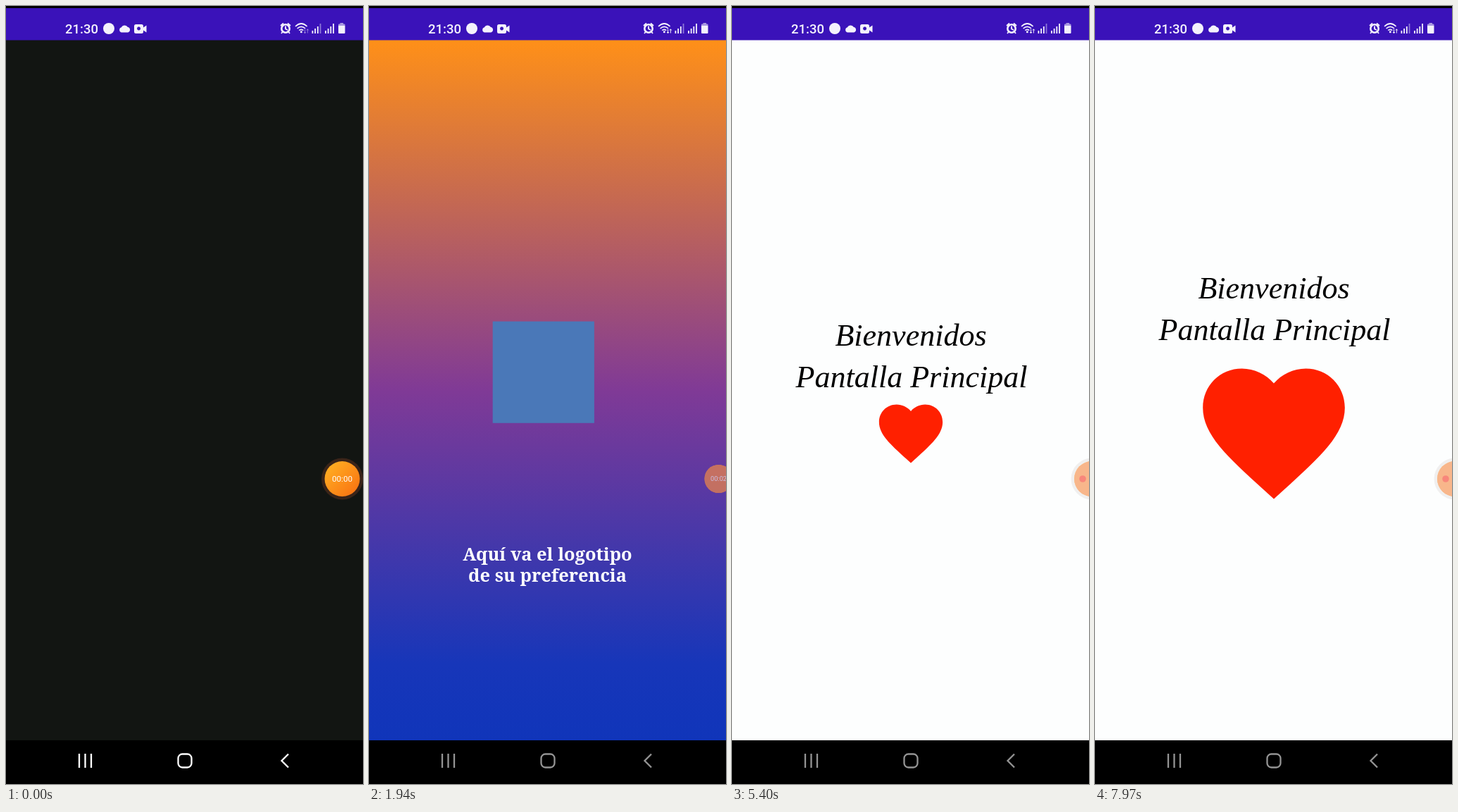
Write an HTML page that moves like this. It is 507x1104 px and loops after 8000 ms.

```html
<!DOCTYPE html>
<html lang="es">
<head>
<meta charset="utf-8">
<title>Bienvenidos</title>
<style>
  html, body { margin: 0; width: 100%; height: 100%; overflow: hidden; background: #000; }
  svg { display: block; }
  text { text-anchor: middle; }
  .clock { font: 500 18.5px Roboto, sans-serif; text-anchor: start; }
  .timer { font: 11.6px Roboto, sans-serif; }
  .slogan { font: bold 24.5px "Noto Serif", serif; }
  .welcome { font: italic 44px "Liberation Serif", serif; }
</style>
</head>
<body>
<svg width="507" height="1104" viewBox="0 0 507 1104">
  <defs>
    <linearGradient id="sky" x2="0" y2="1">
      <stop stop-color="#ff9018"/>
      <stop offset=".5" stop-color="#803a96"/>
      <stop offset=".89" stop-color="#1736b9"/>
      <stop offset="1" stop-color="#1035ba"/>
    </linearGradient>
    <linearGradient id="amber" x2="1" y2="1">
      <stop offset=".1" stop-color="#ffae22"/>
      <stop offset=".9" stop-color="#fa7412"/>
    </linearGradient>
  </defs>

  <rect y="48" width="507" height="994" fill="#fdfefe"/>

  <g id="splash">
    <rect y="48" width="507" height="994" fill="url(#sky)"/>
    <g id="logo"><rect x="-75" y="-32.8" width="139" height="139" fill="#4a78b8"/></g>
    <g id="slogan" class="slogan" fill="#fff">
      <text y="-7">Aquí va el logotipo</text>
      <text y="22">de su preferencia</text>
    </g>
  </g>

  <g id="home">
    <g id="welcome" class="welcome">
      <text x="254">Bienvenidos</text>
      <text x="255" y="59">Pantalla Principal</text>
    </g>
    <path id="heart" fill="#ff2000" d="M12 21.35l-1.45-1.32C5.4 15.36 2 12.28 2 8.5 2 5.42 4.42 3 7.5 3c1.74 0 3.41.81 4.5 2.09C13.09 3.81 14.76 3 16.5 3 19.58 3 22 5.42 22 8.5c0 3.78-3.4 6.86-8.55 11.54z"/>
  </g>

  <rect id="dark" y="48" width="507" height="994" fill="#121512"/>

  <!-- status bar -->
  <rect width="507" height="3"/>
  <rect y="3" width="507" height="45.5" fill="#3a12b9"/>
  <g fill="#f4f2fc">
    <text class="clock" x="84" y="38.7">21:30</text>
    <circle cx="146" cy="32" r="8"/>
    <path d="M164 37.5a3.7 3.7 0 0 1 0-7.2a5 5 0 0 1 8.6-.6a4 4 0 0 1 .6 7.8z"/>
    <path fill-rule="evenodd" d="M184.500 26h8q2.500 0 2.500 2.500v2l4.500-3v10l-4.500-3v2q0 2.500-2.500 2.500h-8q-2.500 0-2.500-2.500v-8q0-2.500 2.500-2.500zm4 3.500a2.500 2.500 0 1 0 .1 0z"/>
    <circle cx="397" cy="32" r="5.700" fill="none" stroke="#f4f2fc" stroke-width="2.600"/>
    <path d="M397 28.500v4l3 1.500M390 28l4-3.500M404 28l-4-3.500M392.500 37l-1.500 2M401.500 37l1.500 2" fill="none" stroke="#f4f2fc" stroke-width="1.800"/>
    <path d="M411 29q8.300-8 16.600 0M413.600 32q5.700-5.300 11.400 0M416.300 34.700q3-2.600 6 0" fill="none" stroke="#f4f2fc" stroke-width="1.700"/>
    <circle cx="419.300" cy="36.800" r="1.500"/>
    <path id="traffic" d="M424.500 33v5.500m-1.500-1.500l1.500 1.700 1.500-1.700M428.300 38.500v-5.500m-1.500 1.500l1.500-1.700 1.500 1.700" fill="none" stroke="#f4f2fc"/>
    <path d="M434.500 35h1.800v4h-1.800zm3.700-3h1.800v7h-1.800zm3.700-3h1.800v10h-1.800zM453 35h1.800v4h-1.800zm3.700-3h1.800v7h-1.800zm3.700-3h1.800v10h-1.800zm3.700-4h1.800v14h-1.800z"/>
    <path d="M445.600 25h1.800v14h-1.800z" opacity=".45"/>
    <path d="M474.500 24h4.500v1.500h1.500q1 0 1 1v1.500h-9.500v-1.500q0-1 1-1h1.500z" opacity=".6"/>
    <path d="M472 28h9.500v10q0 1-1 1h-7.500q-1 0-1-1z"/>
  </g>

  <!-- navigation bar -->
  <rect y="1042" width="507" height="62"/>
  <g id="nav" fill="none" stroke="#fff" stroke-width="2.300">
    <path d="M104 1061v20M112.500 1061v20M121 1061v20M401 1061.500l-9.500 9.500 9.500 9.500"/>
    <rect x="244.500" y="1061.500" width="19" height="19" rx="6"/>
  </g>

  <!-- recorder bubble -->
  <g id="bubble">
    <circle id="ring" r="29.500" fill="#3a2419"/>
    <circle r="25" fill="url(#amber)"/>
    <circle id="tint" r="25" fill="#f58b45"/>
    <text id="timer" class="timer" y="4" fill="#fff">00:00</text>
    <circle id="dot" cx="-13" r="4.800" fill="#f5402c"/>
  </g>
</svg>

<script>
const LOOP = 8000;
const el = Object.fromEntries([...document.querySelectorAll('svg [id]')].map(e => [e.id, e]));
const set = (node, attrs) => { for (const k in attrs) node.setAttribute(k, attrs[k]); };
const mix = (a, b, p) => a + (b - a) * p;
const progress = (t, from, to) => Math.min(1, Math.max(0, (t - from) / (to - from)));
const smooth = p => p * p * (3 - 2 * p);

// Overshoot with tension 4: shoots past 1 and settles back.
const overshoot = p => {
  const u = p - 1;
  return u * u * (5 * u + 4) + 1;
};

const timerStarts = [800, 1700, 2410, 2940, 3470, 4060, 4590];
const pulse = [[5240, 83], [6310, 202], [6860, 83], [7120, 83], [8000, 202]];

function heartWidth(t) {
  let width = pulse[0][1];
  for (let i = 1; i < pulse.length; i++) {
    const [start, a] = pulse[i - 1], [end, b] = pulse[i];
    if (t >= start) width = mix(a, b, smooth(progress(t, start, end)));
  }
  return width;
}

function drawSplash(t) {
  const reveal = progress(t, 350, 500);
  const scale = overshoot(progress(t, 722, 2082));
  set(el.dark, { opacity: 1 - reveal });
  set(el.nav, { opacity: mix(1, .58, reveal) });
  set(el.traffic, { opacity: t < 350 ? .45 : 1 });
  set(el.logo, { transform: `translate(253.500 481.600) scale(${scale})` });
  set(el.slogan, { transform: `translate(253.500 794) scale(${scale})` });
}

function drawHome(t) {
  const fade = smooth(progress(t, 5134, 5394));
  const width = heartWidth(t);
  set(el.splash, { opacity: 1 - fade });
  set(el.home, { opacity: fade });
  set(el.welcome, { transform: `translate(0 ${486 - .597 * (width - 83)})` });
  set(el.heart, { transform: `translate(254 607) scale(${width / 20}) translate(-12 -12.175)` });
}

function drawBubble(t) {
  const stopped = t >= 4790;
  const dock = smooth(progress(t, 70, 550));
  const x = stopped ? 511 : mix(477.5, 496.5, dock);
  const scale = stopped ? 1 : mix(1, .8, dock);
  set(el.bubble, {
    transform: `translate(${x} 671) scale(${scale})`,
    opacity: stopped ? .62 : mix(1, .68, dock)
  });
  set(el.ring, { opacity: stopped ? .1 : 1 - dock });
  set(el.tint, { opacity: dock });
  set(el.dot, { opacity: stopped ? 1 : 0 });
  const seconds = timerStarts.filter(start => t >= start).length;
  el.timer.textContent = stopped ? '' : '00:0' + seconds;
}

function render(now) {
  const t = now % LOOP;
  drawSplash(t);
  drawHome(t);
  drawBubble(t);
}

const startTime = performance.now();
function tick() {
  render(performance.now() - startTime);
  requestAnimationFrame(tick);
}
tick();
</script>
</body>
</html>
```
